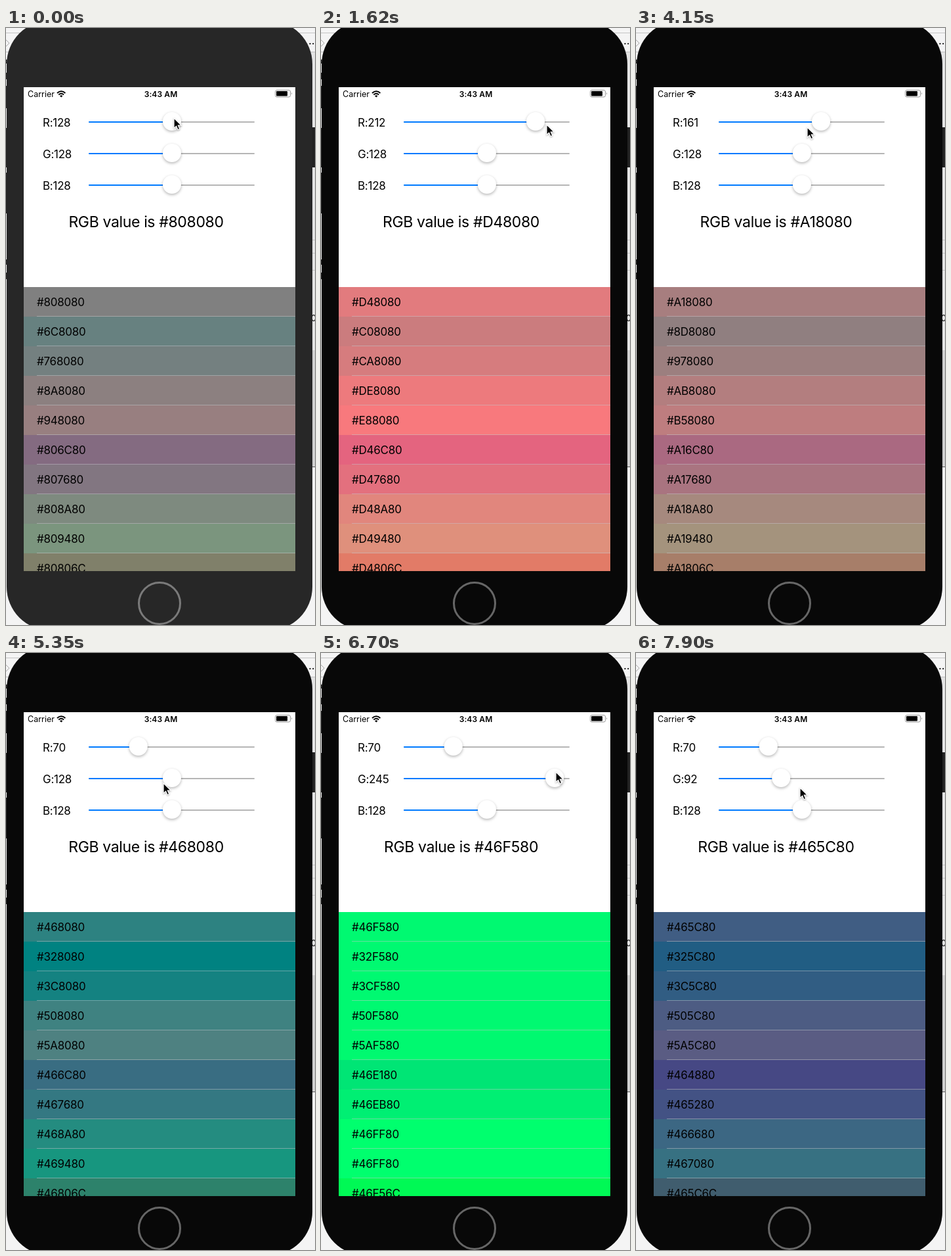
These frames come from a looping animation (471x908 px, 8000 ms). An HTML page:

```html
<!DOCTYPE html>
<html lang="en">
<head>
<meta charset="utf-8">
<title>RGB sliders</title>
<style>
  html, body { margin: 0; width: 100%; height: 100%; overflow: hidden; background: #f4f4f4; }
  svg { display: block; width: 471px; height: 908px; }
  text { font-family: Inter, Roboto, "Liberation Sans", sans-serif; font-size: 17px; letter-spacing: -0.25px; }
  .small { font-size: 12.5px; letter-spacing: 0; }
  .time { font-size: 12px; font-weight: 600; letter-spacing: 0.1px; }
  .title { font-size: 23px; letter-spacing: -0.35px; }
  .knob { filter: drop-shadow(0 2px 2px rgba(0,0,0,.2)) drop-shadow(0 1px 2px rgba(0,0,0,.1)); }
</style>
</head>
<body>
<svg viewBox="0 0 471 908">
  <defs><clipPath id="screen"><rect x="27" y="90" width="414" height="736"/></clipPath></defs>
  <rect width="471" height="908" fill="#f4f4f4"/>
  <rect x="460" y="36" width="11" height="632" fill="#e4e4e4"/>
  <path d="M0 7.5H471M0 36.5H471M466 322.5h5M466 342.5h5M466 368.5h5" stroke="#c4c4c4"/>
  <rect x="465" y="490" width="6" height="178" fill="#d0d0d0"/>
  <path d="M465 667.5h6" stroke="#555"/>
  <path d="M0 18l5 5-5 5" fill="none" stroke="#aaa"/>
  <path d="M0 48v6M0 68v10M0 88v34M0 152v60M0 220v62M0 352v8M0 372v10" stroke="#222" stroke-width="3"/>
  <rect x="465" y="151" width="6" height="61" fill="#222"/>
  <text x="461" y="25">...</text>
  <text class="small" x="465" y="446">08</text>
  <rect id="body" x="1" y="-11" width="466" height="927" rx="66"/>
  <circle id="home" cx="234" cy="875" r="31.5" fill="none" stroke-width="3"/>
  <g clip-path="url(#screen)">
    <rect x="27" y="90" width="414" height="736" fill="#fff"/>
    <text class="small" x="33" y="105">Carrier</text>
    <path d="M78 99q6.2-5.5 12.4 0M80.300 101.500q3.900-3.500 7.800 0" fill="none" stroke="#000" stroke-width="2"/>
    <path d="M82 103.200q2.200-1.800 4.400 0l-2.200 2.300z"/>
    <text class="time" x="236" y="104.500" text-anchor="middle">3:43 AM</text>
    <rect x="410.500" y="94.500" width="23" height="10.500" rx="2.500" fill="none" stroke="#999"/>
    <rect x="412" y="96" width="17" height="7.500" rx="1"/>
    <path d="M435 98q2 1.700 0 3.500z" fill="#999"/>
    <g id="sliders"></g>
    <text id="title" class="title" x="213.500" y="302.500" text-anchor="middle"></text>
    <g id="rows"></g>
  </g>
  <path id="cursor" d="M0 0V15.500L3.600 12.200L6 17.800L8.700 16.600L6.300 11.200H11.200Z" stroke="#fff" stroke-width="1.200" style="filter:drop-shadow(0 1px 1px rgba(0,0,0,.3))"/>
</svg>
<script>
const LOOP = 8000, STEP = 150;
const anchors = [0, 1170, 3410, 4150];

// Tracks of [time, value...]
const red = [
  [150, 128], [300, 131], [600, 150], [1170, 203], [1620, 212], [2070, 224],
  [2220, 224], [2970, 255], [3560, 255], [3860, 226], [4450, 94], [4750, 70]
];
const green = [
  [5350, 128], [5800, 163], [6100, 208], [6400, 236], [6700, 245],
  [6850, 238], [7450, 134], [7750, 92]
];
const pointer = [
  [150, 256, 137], [600, 286, 140], [1170, 332, 145], [1620, 344, 147],
  [2070, 351, 149], [2220, 351, 149], [3410, 432, 151], [3710, 380, 151],
  [4150, 261, 151], [4450, 209, 154], [4900, 203, 155], [5350, 240, 198],
  [6100, 326, 188], [6700, 358, 181], [7450, 252, 193], [7750, 228, 198],
  [7900, 250, 205]
];

// Red, green and blue offsets of each row
const nudges = [-20, -10, 10, 20];
const shifts = [
  [0, 0, 0],
  ...nudges.map(d => [d, 0, 0]),
  ...nudges.map(d => [0, d, 0]),
  [0, 0, -20]
];

const $ = id => document.getElementById(id);

function add(parent, tag, attrs) {
  const el = document.createElementNS("http://www.w3.org/2000/svg", tag);
  for (const k in attrs) el.setAttribute(k, attrs[k]);
  return parent.appendChild(el);
}

const clamp = (v, max) => Math.min(max, Math.max(0, v));
const hex = rgb => "#" + rgb.map(v => v.toString(16).padStart(2, "0")).join("").toUpperCase();

// Wide-gamut values shown on an sRGB screen
const toLinear = v => (v /= 255) <= 0.04045 ? v / 12.92 : ((v + 0.055) / 1.055) ** 2.4;
const toByte = v => {
  v = clamp(v, 1);
  return Math.round(255 * (v <= 0.0031308 ? v * 12.92 : 1.055 * v ** (1 / 2.4) - 0.055));
};
function shown(rgb) {
  const [r, g, b] = rgb.map(toLinear);
  const out = [
    1.2249 * r - 0.2247 * g,
    -0.042 * r + 1.0419 * g,
    -0.0197 * r - 0.0786 * g + 1.0979 * b
  ];
  return `rgb(${out.map(toByte)})`;
}

const sliders = ["R", "G", "B"].map((name, i) => {
  const g = $("sliders"), y = 143 + 48 * i;
  const label = add(g, "text", { x: 56, y: y + 7 });
  const track = { x: 126, y: y - 1, width: 253, height: 2, rx: 1 };
  add(g, "rect", { ...track, fill: "#b6b6b6" });
  const fill = add(g, "rect", { ...track, fill: "#007aff" });
  const knob = add(g, "circle", { class: "knob", cy: y - 1, r: 14, fill: "#fff" });
  return v => {
    const x = 140 + 225 * v / 255;
    label.textContent = name + ":" + v;
    fill.setAttribute("width", x - 126);
    knob.setAttribute("cx", x);
  };
});

const rows = shifts.map((shift, i) => {
  const g = $("rows"), y = 394 + 45 * i;
  const back = add(g, "rect", { x: 27, y, width: 414, height: 45 });
  add(g, "rect", { x: 47, y: y + 44, width: 394, height: 1, fill: "#c8c7cc", opacity: 0.5 });
  const label = add(g, "text", { x: 47, y: y + 29 });
  return base => {
    const rgb = base.map((v, k) => clamp(v + shift[k], 255));
    back.setAttribute("fill", shown(rgb));
    label.textContent = hex(rgb);
  };
});

function valueAt(track, t) {
  const i = track.findIndex(p => p[0] >= t);
  const b = track.at(i), a = i > 0 ? track[i - 1] : b;
  const f = a === b ? 0 : (t - a[0]) / (b[0] - a[0]);
  return a.map((v, k) => Math.round(v + (b[k] - v) * f)).slice(1);
}

function draw(time) {
  const start = anchors.filter(a => a <= time).pop();
  const t = start + Math.floor((time - start) / STEP) * STEP;
  const rgb = [...valueAt(red, t), ...valueAt(green, t), 128];
  const active = t >= STEP;
  $("body").setAttribute("fill", active ? "#080808" : "#272727");
  $("home").setAttribute("stroke", active ? "#666" : "#7a7a7a");
  sliders.forEach((set, i) => set(rgb[i]));
  rows.forEach(set => set(rgb));
  $("title").textContent = "RGB value is " + hex(rgb);
  $("cursor").setAttribute("transform", `translate(${valueAt(pointer, t)})`);
}

const origin = performance.now();
function tick() {
  draw((performance.now() - origin) % LOOP);
  requestAnimationFrame(tick);
}
tick();
</script>
</body>
</html>
```
